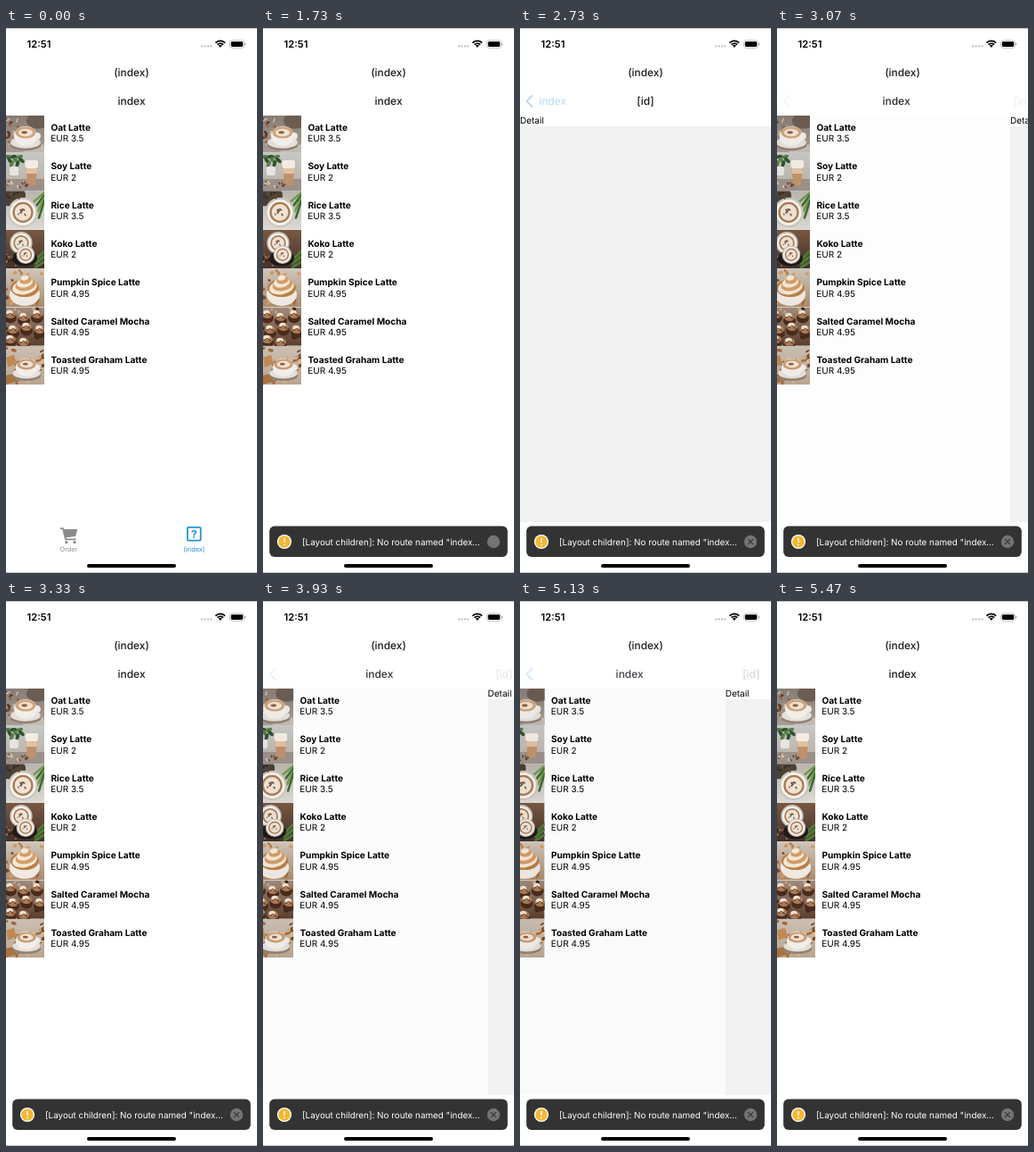
These frames come from a looping animation (282 by 610 pixels, 5.53 s). An HTML page with a canvas:

```html
<!DOCTYPE html>
<html lang="en">
<head>
<meta charset="utf-8">
<title>Coffee list navigation</title>
<style>
  html, body { margin: 0; width: 100%; height: 100%; overflow: hidden; background: #fff; }
  canvas { display: block; width: 282px; height: 610px; }
</style>
</head>
<body>
<canvas id="stage"></canvas>
<script>
const W = 282, H = 610, LOOP = 5530, FPS = 15;
const TOP = 98, BOTTOM = 553, ROW = 43.35, LIST_Y = 95.7;
const INK = '#1b1c20', BLUE = '#1277e3', TAB_BLUE = '#2292dc', GRAY = '#8c8c8d', EDGE = '#c6c6c6';
const FONT = 'Inter, Roboto, sans-serif';

const canvas = document.getElementById('stage');
const ctx = canvas.getContext('2d');
const dpr = window.devicePixelRatio || 1;
canvas.width = W * dpr;
canvas.height = H * dpr;
ctx.textRendering = 'geometricPrecision';

function text(str, x, y, size, weight = 400, color = '#000', align = 'left') {
  ctx.font = `${weight} ${size}px ${FONT}`;
  ctx.fillStyle = color;
  ctx.textAlign = align;
  ctx.fillText(str, x, y);
}

function rect(color, x, y, w, h, r = 0) {
  ctx.fillStyle = color;
  ctx.beginPath();
  ctx.roundRect(x, y, w, h, r);
  ctx.fill();
}

function frame(color, width, x, y, w, h, r) {
  ctx.strokeStyle = color;
  ctx.lineWidth = width;
  ctx.beginPath();
  ctx.roundRect(x, y, w, h, r);
  ctx.stroke();
}

function oval(color, x, y, rx, ry = rx, turn = 0) {
  ctx.fillStyle = color;
  ctx.beginPath();
  ctx.ellipse(x, y, rx, ry, turn, 0, Math.PI * 2);
  ctx.fill();
}

function line(color, width, ...pts) {
  ctx.strokeStyle = color;
  ctx.lineWidth = width;
  ctx.lineCap = ctx.lineJoin = 'round';
  ctx.beginPath();
  for (let i = 0; i < pts.length; i += 2) ctx.lineTo(pts[i], pts[i + 1]);
  ctx.stroke();
}

function poly(color, ...pts) {
  ctx.fillStyle = color;
  ctx.beginPath();
  for (let i = 0; i < pts.length; i += 2) ctx.lineTo(pts[i], pts[i + 1]);
  ctx.fill();
}

function backdrop(from, to) {
  const g = ctx.createLinearGradient(0, 0, 0, ROW);
  g.addColorStop(0, from);
  g.addColorStop(1, to);
  ctx.fillStyle = g;
  ctx.fillRect(0, 0, 43, ROW);
}

function crumbs(seed, n, colors, x, y, w, h, size = 2) {
  const rnd = () => (seed = (seed * 16807) % 2147483647) / 2147483647;
  for (let i = 0; i < n; i++) {
    oval(colors[i % colors.length], x + rnd() * w, y + rnd() * h,
      size * (0.6 + rnd()), size * (0.4 + rnd() * 0.4), rnd() * 3);
  }
}

function cup(x, y, r, foam) {
  oval('#8f8073', x, y + r * 0.85, r * 1.35, r * 0.5);
  oval('#e4dfd8', x, y + r * 0.65, r * 1.3, r * 0.5);
  oval('#eeeae5', x + r, y + r * 0.1, r * 0.3);
  oval('#f1eeea', x, y + r * 0.1, r, r * 0.85);
  oval(foam, x, y - r * 0.2, r * 0.88, r * 0.5);
  oval('#efe2d3', x, y - r * 0.2, r * 0.62, r * 0.32);
  oval('#8f5f3e', x - r * 0.1, y - r * 0.22, r * 0.25, r * 0.12);
}

function cupAbove(x, y, r) {
  oval('#cbc4bb', x, y, r * 1.15);
  oval('#f5f2ee', x, y, r);
  oval('#a97a53', x, y, r * 0.8);
  oval('#efe3d5', x, y, r * 0.64);
  crumbs(44, 5, ['#75533c'], x - r * 0.35, y - r * 0.25, r * 0.6, r * 0.5, r * 0.1);
}

const photos = [
  () => {
    backdrop('#857b74', '#a89d94');
    oval('#6c5d52', 36, 8, 13, 9);
    oval('#c3bab1', 34, 40, 16, 6);
    crumbs(31, 22, ['#5c3623', '#94643f', '#cdb8a3'], 0, 4, 14, 36);
    cup(22, 24, 13, '#cfa47c');
  },
  () => {
    backdrop('#c6c8c6', '#b9aea4');
    rect('#9c918a', 0, 30, 43, 14);
    for (let i = 0; i < 8; i++) oval(i % 2 ? '#2f5230' : '#567d45', 2 + i * 2.2, 5 + (i % 3) * 4, 4, 2, i);
    rect('#e6e5e1', 4, 16, 10, 10, 2);
    poly('#c0926a', 21.5, 14, 36, 14, 33, 37, 24.5, 37);
    rect('#f3ece3', 21.5, 9, 14.5, 9, 2);
    rect('#dfc2a2', 22.5, 18, 12.5, 6);
    crumbs(57, 14, ['#6f472d', '#d8c1a6'], 2, 33, 24, 8, 1.6);
  },
  () => {
    backdrop('#b9b4ac', '#dcd9d4');
    oval('#4a4136', 5, 5, 17, 12);
    for (let i = 0; i < 4; i++) line(i % 2 ? '#3d6a33' : '#6f9a4e', 2.6, 43, 2 + i * 3, 31 + i * 2, 12 + i * 6);
    cupAbove(19, 24, 14.5);
    crumbs(12, 14, ['#2c2019', '#6b4b34'], 1, 2, 14, 7, 1.3);
  },
  () => {
    backdrop('#7a5943', '#43302a');
    for (let i = 0; i < 3; i++) line('#4f7a37', 3, 43, 24 + i * 6, 33, 34 + i * 4);
    cupAbove(17, 15, 11);
    oval('#1f1917', 21, 32, 14, 9);
    cupAbove(22, 28, 9);
    crumbs(78, 12, ['#2b1c15', '#a6764e'], 0, 25, 11, 16, 1.4);
  },
  () => {
    backdrop('#cfc6bb', '#a98a6d');
    crumbs(19, 16, ['#a66a37', '#d19a61', '#784624'], 0, 4, 43, 38, 2.6);
    oval('#efe9e1', 21, 29, 17, 13);
    oval('#b97f48', 21, 22, 16, 10);
    for (let i = 0; i < 5; i++) {
      oval(i % 2 ? '#d29d68' : '#f4e7d6', 21 + (i % 2), 21 - i * 2.6, 14 - i * 2.4, 8 - i * 1.3, -0.2);
    }
  },
  () => {
    backdrop('#a18c7c', '#5b3d2c');
    crumbs(65, 16, ['#3c2418', '#c9a888'], 0, 0, 43, 43, 2.4);
    for (let i = 0; i < 8; i++) {
      const x = 5 + (i % 3) * 15 + (i > 2 && i < 6 ? 3 : 0), y = 8 + Math.floor(i / 3) * 14 + (i % 2) * 3;
      oval('#4a2b1b', x, y + 4, 7, 6);
      oval('#a97c5a', x, y, 6, 4.6);
      oval('#efe2d2', x - 1, y - 2, 3.6, 2.6);
      line('#70421f', 1.2, x - 4, y + 1, x, y - 1, x + 4, y + 2);
    }
  },
  () => {
    backdrop('#cbbfb2', '#b9a591');
    crumbs(91, 28, ['#a2683a', '#744627', '#dcb588'], 0, 2, 43, 40, 2.4);
    poly('#c18a54', 0, 13, 9, 10, 12, 20, 2, 24);
    poly('#a8733f', 0, 33, 10, 31, 12, 40, 0, 43);
    cup(23, 23, 12, '#c99b70');
  }
];

const drinks = [
  ['Oat Latte', '3.5'], ['Soy Latte', '2'], ['Rice Latte', '3.5'], ['Koko Latte', '2'],
  ['Pumpkin Spice Latte', '4.95'], ['Salted Caramel Mocha', '4.95'], ['Toasted Graham Latte', '4.95']
];

function drawList(x) {
  drinks.forEach(([name, price], i) => {
    const y = LIST_Y + i * ROW;
    ctx.save();
    ctx.translate(x, y);
    ctx.beginPath();
    ctx.rect(0, 0, 43, ROW);
    ctx.clip();
    photos[i]();
    ctx.restore();
    text(name, x + 50.4, y + 19.2, 10.1, 700);
    text('EUR ' + price, x + 50.2, y + 31.6, 10);
  });
}

function drawPages(p) {
  ctx.save();
  ctx.beginPath();
  ctx.rect(0, TOP, W, BOTTOM - TOP);
  ctx.clip();
  const x = W * (1 - p);
  if (p < 1) {
    drawList(-0.3 * W * p);
    rect(`rgba(0,0,0,${0.1 * p})`, 0, TOP, W, BOTTOM - TOP);
  }
  if (p > 0) {
    rect('#fff', x, TOP, W, 12);
    rect('#f0f1f0', x, 110, W, BOTTOM - 110);
    text('Detail', x, 107.2, 10);
  }
  ctx.restore();
}

function drawNav(p, pressed) {
  ctx.globalAlpha = 1 - p;
  text('index', 141 - 98 * p, 86.2, 12, 550, INK, 'center');
  ctx.globalAlpha = p;
  text('[id]', 141 + 145 * (1 - p), 86.2, 12, 550, INK, 'center');
  ctx.globalAlpha = p * (pressed ? 0.3 : 1);
  line(BLUE, 1.8, 13.6, 75.6, 7.6, 81.8, 13.6, 88);
  ctx.globalAlpha *= p;
  text('index', 21.6 + 98 * (1 - p), 86.2, 11.9, 400, BLUE);
  ctx.globalAlpha = 1;
}

function drawStatus() {
  rect(EDGE, 0, 0, W, 1);
  rect(EDGE, 0, H - 1, W, 1);
  text('12:51', 23.6, 22.2, 11.2, 600);
  for (let i = 0; i < 4; i++) oval('#b9b9b9', 220.2 + i * 3.4, 20.4, 1.1);
  ctx.strokeStyle = '#000';
  ctx.lineCap = 'butt';
  ctx.lineWidth = 1.8;
  for (const r of [4.5, 7.4]) {
    ctx.beginPath();
    ctx.arc(240.8, 21.8, r, -Math.PI * 0.76, -Math.PI * 0.24);
    ctx.stroke();
  }
  poly('#000', 240.8, 22, 238.7, 19.6, 240.8, 18.8, 242.9, 19.6);
  frame('#a9a9a9', 0.7, 251.5, 13.9, 16, 8.4, 2.5);
  rect('#000', 252.8, 15.2, 13.4, 5.8, 1.4);
  rect('#a9a9a9', 268.3, 16.8, 1, 2.6, 0.5);
}

function drawTabs() {
  line(GRAY, 1.7, 61.6, 560.2, 64, 560.2, 67, 572.3, 78, 572.3);
  poly(GRAY, 64, 561, 80.3, 561, 78.2, 569, 66, 570.4);
  oval(GRAY, 67.8, 575.6, 1.7);
  oval(GRAY, 77, 575.6, 1.7);
  text('Order', 70.4, 586.2, 7.3, 400, GRAY, 'center');
  frame(TAB_BLUE, 1.8, 203.9, 558.8, 14.8, 14.8, 1);
  text('?', 211.3, 570.8, 12.4, 700, TAB_BLUE, 'center');
  text('(index)', 211.4, 586.2, 7.4, 400, TAB_BLUE, 'center');
}

function drawToast(withCross) {
  rect('#333', 7.2, 557.6, 267.6, 34.4, 5.7);
  oval('#fff', 24, 575, 8.1);
  oval('#f5b733', 24, 575, 6.8);
  line('#fff', 1.5, 24, 571.4, 24, 575.6);
  oval('#fff', 24, 578.4, 0.9);
  text('[Layout children]: No route named "index…', 44, 578.7, 9.85, 400, '#fff');
  oval('#747474', 259, 575, 7.2);
  if (withCross) {
    line('#333', 1.1, 256.3, 572.3, 261.7, 577.7);
    line('#333', 1.1, 261.7, 572.3, 256.3, 577.7);
  }
}

// Critically damped spring, settled after 490 ms.
function spring(ms) {
  if (ms <= 0) return 0;
  if (ms > 490) return 1;
  const y = ms * 0.018;
  return 1 - (1 + y) * Math.exp(-y);
}

const progress = t =>
  spring(t - 1807) - spring(t - 2827) + spring(t - 3903) - spring(t - 4960);

const between = (t, a, b) => t >= a && t < b;

function draw(now) {
  // The picture advances on a 15 fps clock.
  const t = Math.floor(((now % LOOP) + 5) * FPS / 1000) * 1000 / FPS;
  const p = Math.min(1, Math.max(0, progress(t)));
  ctx.setTransform(dpr, 0, 0, dpr, 0, 0);
  rect('#fff', 0, 0, W, H);
  drawPages(p);
  drawStatus();
  text('(index)', 141, 54.2, 11.9, 550, INK, 'center');
  drawNav(p, between(t, 2730, 2850) || between(t, 4860, 4980));
  if (t < 1730) drawTabs();
  else drawToast(t > 1860);
  rect('#000', 91, 600, 100, 4, 2);
}

let start;
function tick(now) {
  start ??= now;
  draw(now - start);
  requestAnimationFrame(tick);
}
draw(0);
requestAnimationFrame(tick);
</script>
</body>
</html>
```
